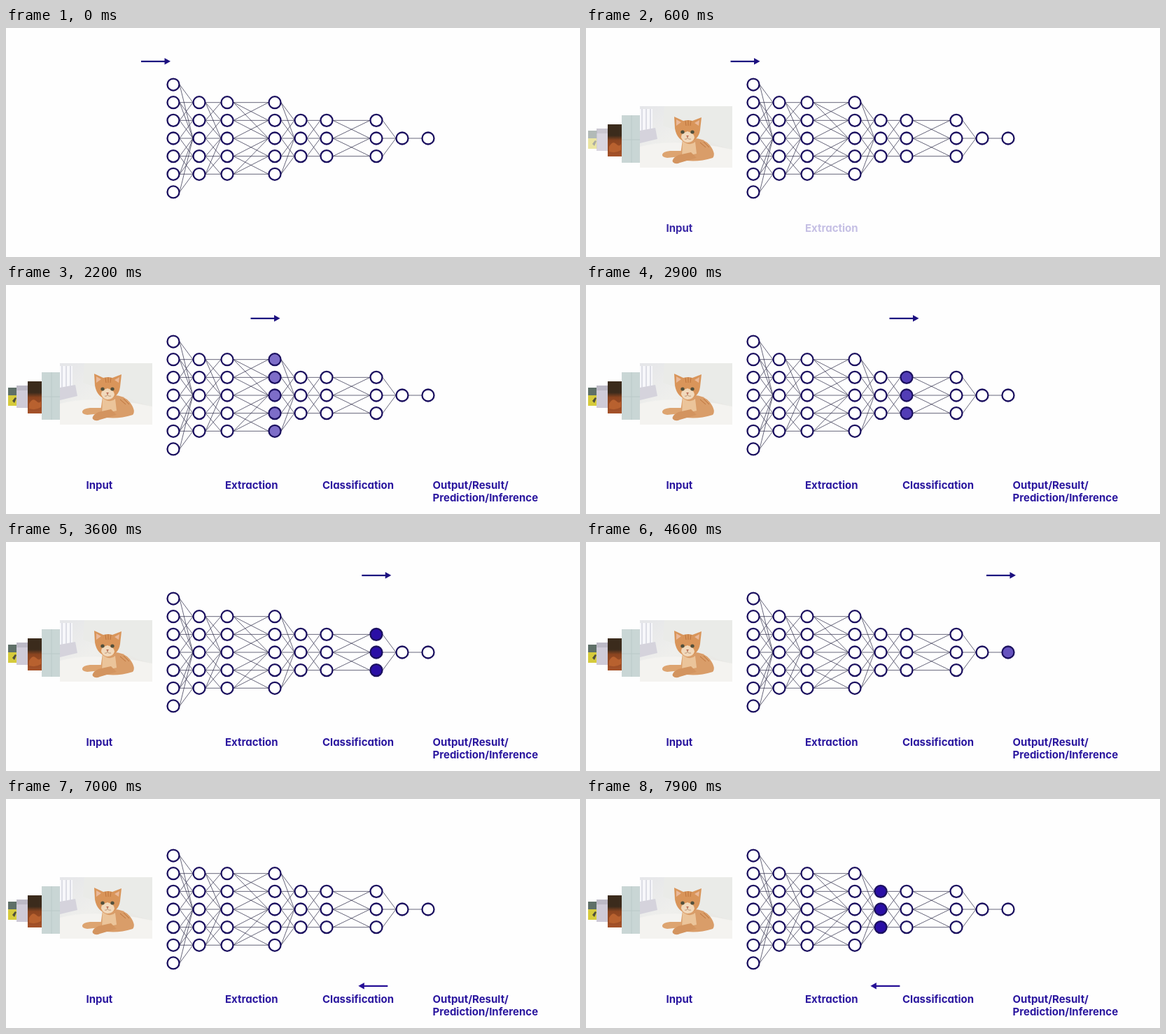
An HTML page that plays this animation: 820 px wide and 328 px high, repeating every 8000 ms.

```html
<!DOCTYPE html>
<html lang="en">
<head>
<meta charset="utf-8">
<title>Network training</title>
<style>
  html, body { margin: 0; width: 100%; height: 100%; overflow: hidden; background: #fefefe; }
  svg { display: block; width: 820px; height: 328px; }
  .label { font: 700 15px Inter, "Open Sans", sans-serif; font-feature-settings: "cv11"; fill: #2b179f; }
  .answer { font: 900 13.6px Inter, "Liberation Sans", sans-serif; fill: #1c1284; }
  .edge { stroke: #35334f; stroke-width: .75; }
  .node { fill: #2a0fa5; stroke: #1b105f; stroke-width: 2.3; }
</style>
</head>
<body>
<svg viewBox="0 0 820 328">
  <defs>
    <linearGradient id="room" x2="1" y2="1">
      <stop offset="0" stop-color="#e5e6e9"/>
      <stop offset=".45" stop-color="#efefec"/>
      <stop offset="1" stop-color="#e3e2de"/>
    </linearGradient>
    <linearGradient id="earth" x2="0" y2="1">
      <stop offset=".35" stop-color="#3b2b1c"/>
      <stop offset=".5" stop-color="#8c4520"/>
      <stop offset="1" stop-color="#a5522a"/>
    </linearGradient>
  </defs>

  <g id="photos">
    <g>
      <rect x="3" y="147" width="13" height="26" fill="#d6cb3c"/>
      <rect x="3" y="147" width="13" height="11" fill="#5f7068"/>
      <path d="M9 166l4-5 2 1-3 7z" fill="#50503c"/>
    </g>
    <g>
      <rect x="15" y="144" width="17" height="32" fill="#cfcbd8"/>
      <path d="M15 144h16v7H15z" fill="#bcb9c6"/>
    </g>
    <g>
      <rect x="31" y="138" width="21" height="46" fill="url(#earth)"/>
      <path d="M33 170q5-9 10-4t7 0v9q-8 5-17 2z" fill="#b8612f"/>
    </g>
    <g>
      <rect x="51" y="125" width="27" height="68" fill="#c9d6d5"/>
      <path d="M51 160h26M65 125v68" stroke="#bac9c8"/>
    </g>
    <g>
      <rect x="77" y="112" width="132" height="88" fill="url(#room)"/>
      <path d="M77 116h18v34H77z" fill="#f7f7fa"/>
      <path d="M80 116v34M86 116v32M92 116v30" stroke="#dcdde5" stroke-width="2"/>
      <path d="M77 147l22-4 3 16-25 6z" fill="#d5d3dc"/>
      <path d="M112 112h97v62q-20-4-36-14-40-12-63-20z" fill="#eaebe8"/>
      <path d="M77 170q50-14 132 4v26H77z" fill="#f4f3f0"/>
      <path d="M138 160q26-7 39 8 9 12 4 18-26 8-47 2z" fill="#d99d69"/>
      <path d="M138 162q11 8 18 1l2 17-21 5z" fill="#ebc49a"/>
      <path d="M136 176l-16 0q-10 1-11 5t7 5l20-2z" fill="#dda470"/>
      <path d="M150 178l-18 4q-10 5-8 10 4 4 10 1l24-7z" fill="#d3945f"/>
      <path d="M127 144l-1-17 13 6q7-2 13 0l13-5-2 18q-2 15-18 18-15-3-18-20z" fill="#d9955a"/>
      <path d="M129 140v-9l7 4zM161 140l1-8-7 4z" fill="#eab999"/>
      <path d="M145 148q-10 3-9 9 3 7 9 7 8 0 10-7 0-6-10-9z" fill="#f1d9bc"/>
      <path d="M142 133l1 7M146 132v8M150 133l-1 7M163 164l8 7M168 163l8 8" stroke="#bd743d" fill="none"/>
      <ellipse cx="138" cy="149" rx="2.7" ry="2.5" fill="#51503c"/>
      <ellipse cx="152" cy="149" rx="2.7" ry="2.5" fill="#51503c"/>
      <path d="M143 154h4l-2 2.5z" fill="#b8654f"/>
      <path d="M141 159q4 1 4-3 0 4 5 3" stroke="#a8785a" stroke-width=".7" fill="none"/>
    </g>
  </g>

  <g id="edges"></g>
  <g id="nodes"></g>

  <g id="labels" class="label">
    <text x="114.5" y="291.5">Input</text>
    <text x="313" y="291.5">Extraction</text>
    <text x="452" y="291.5">Classification</text>
    <text x="609.5" y="291.5">Output/Result/<tspan x="609.5" y="310">Prediction/Inference</tspan></text>
  </g>

  <g id="answer">
    <circle cx="645.2" cy="157.3" r="7" fill="#fff" stroke="#d8232a" stroke-width="1.4"/>
    <path d="M642.2 154.3l6 6m0-6l-6 6" stroke="#d8232a" stroke-width="3.1"/>
    <text class="answer" x="658.3" y="162">DOG</text>
  </g>

  <g id="forward" fill="#1c1080">
    <path d="M-42-1.1h35v2.2h-35zM-8.5-4.7L0 0-8.5 4.7z"/>
  </g>
  <g id="back" fill="#260f96">
    <path d="M42-1.1H7v2.2h35zM8.5-4.7L0 0l8.5 4.7z"/>
  </g>
</svg>

<script>
const LOOP = 8000, MID = 158, ROW = 25.65;
const $ = id => document.getElementById(id);

// x, node count, times at which the layer lights up
const layers = [
  [239, 7, [700]],
  [276, 5, [1230]],
  [316, 5, [1600]],
  [384, 5, [2140]],
  [421, 3, [2480, 7740]],
  [458, 3, [2820, 7330]],
  [529, 3, [3450, 6590]],
  [566, 1, [3800, 6200]],
  [603, 1, [4350, 5770]]
].map(([x, count, pulses]) => ({
  x, pulses, nodes: [],
  rows: Array.from({ length: count }, (_, i) => i - (count - 1) / 2)
}));

function add(parent, tag, attrs) {
  const el = document.createElementNS("http://www.w3.org/2000/svg", tag);
  for (const key in attrs) el.setAttribute(key, attrs[key]);
  return parent.appendChild(el);
}

const rowY = row => MID + row * ROW;

layers.forEach((layer, i) => {
  const next = layers[i + 1];
  for (const a of layer.rows) {
    layer.nodes.push(add($("nodes"), "circle", { class: "node", cx: layer.x, cy: rowY(a), r: 8.5 }));
    if (!next) continue;
    for (const b of next.rows) {
      if (Math.abs(a - b) > 1 && b !== 0) continue;
      add($("edges"), "line", {
        class: "edge", x1: layer.x + 9, y1: rowY(a), x2: next.x - 9, y2: rowY(b)
      });
    }
  }
});

const clamp = v => Math.min(1, Math.max(0, v));
const ramp = (t, start, length) => clamp((t - start) / length);
const ease = u => (1 - Math.cos(Math.PI * clamp(u))) / 2;
const pulse = (t, start) => Math.min(ramp(t, start, 100), 1 - ramp(t, start + 220, 110));
const labelStarts = [250, 500, 700, 880];

function place(el, x, y, opacity) {
  el.setAttribute("transform", `translate(${x.toFixed(2)} ${y})`);
  el.style.opacity = opacity;
}

function draw(t) {
  [...$("photos").children].forEach((el, i) => {
    el.style.opacity = ramp(t, 100 + (4 - i) * 90, 300);
  });
  [...$("labels").children].forEach((el, i) => {
    el.style.opacity = ramp(t, labelStarts[i], 380);
  });
  for (const { nodes, pulses } of layers) {
    const glow = Math.max(...pulses.map(start => pulse(t, start)));
    for (const node of nodes) {
      const mix = (from, to) => Math.round(from + (to - from) * glow);
      node.style.fill = `rgb(${mix(255, 42)},${mix(255, 15)},${mix(255, 165)})`;
    }
  }
  $("answer").style.opacity = Math.min(ramp(t, 4750, 250), 1 - ramp(t, 6450, 250));
  place($("forward"), 235 + 385 * ease(t / 5000), 47.8, 1 - ramp(t, 4950, 200));
  place($("back"), 620 - 427 * ease((t - 4900) / 6000), 267.8, ramp(t, 5000, 200));
}

function tick(now) {
  draw(now % LOOP);
  requestAnimationFrame(tick);
}
draw(0);
requestAnimationFrame(tick);
</script>
</body>
</html>
```
